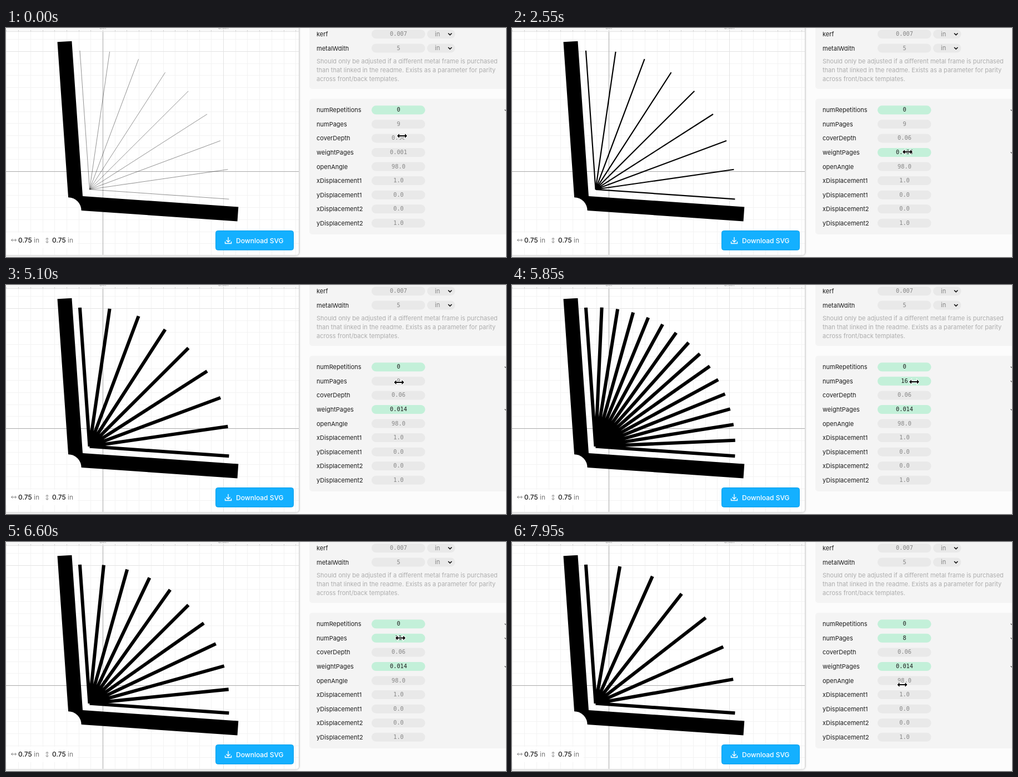
Recreate the animation shown at these times as an HTML page. Size 900 by 414 pixels, loop 8 s.

```html
<!DOCTYPE html>
<html lang="en">
<head>
<meta charset="utf-8">
<title>Book template editor</title>
<style>
  html, body { margin: 0; width: 100%; height: 100%; overflow: hidden; background: #fcfcfc; }
  svg { display: block; width: 100vw; height: 100vh; }
  text { font-family: Inter, sans-serif; font-size: 11px; fill: #1c1c1c; }
  .note { fill: #adadad; }
  .value { font-family: "DejaVu Sans Mono", monospace; font-size: 10.3px; fill: #858585; text-anchor: middle; }
  .pill { fill: #e9e9e9; }
  .changed .pill { fill: #c3f0d9; }
  .changed .value { fill: #1c1c1c; }
  .reset { display: none; fill: none; stroke: #555; stroke-width: 1.2; }
  .changed .reset { display: inline; }
  .size { font-size: 12px; font-weight: 500; }
  .unit { font-size: 12px; fill: #777; }
  .ruler { font-size: 8px; fill: #999; text-anchor: middle; }
  .icon { fill: none; stroke: #888; }
</style>
</head>
<body>
<svg viewBox="0 0 900 414">
  <defs>
    <filter id="shadow">
      <feDropShadow dx="0" dy="0" stdDeviation="1.5" flood-opacity=".25"/>
    </filter>
    <path id="span" d="M-4.5 0H4.5M-2 -2.5L-4.5 0L-2 2.5M2 -2.5L4.5 0L2 2.5"/>
  </defs>
  <rect width="900" height="414" fill="#fcfcfc"/>
  <rect x="-10" y="-10" width="537.5" height="421" rx="5" fill="#fff" stroke="#d4d4d4" filter="url(#shadow)"/>
  <g id="grid"></g>
  <path d="M118.4 23.7L138 304L418.3 323.6L416.5 349.5L135.7 329.9A24 24 0 0 0 112.1 306.2L92.5 25.3Z"/>
  <path id="pages" stroke="#000" fill="none"/>

  <rect x="-4" y="370" width="133" height="28" rx="4" fill="#fff" fill-opacity=".85"/>
  <use class="icon" href="#span" transform="translate(14 383.5)"/>
  <use class="icon" href="#span" transform="translate(74 384) rotate(90)"/>
  <text class="size" x="22" y="388">0.75</text><text class="unit" x="50" y="388">in</text>
  <text class="size" x="83" y="388">0.75</text><text class="unit" x="111" y="388">in</text>

  <rect x="377.5" y="366.5" width="140" height="35" rx="4" fill="#14b0ff" stroke="#0fa0ea"/>
  <path d="M400 378v9m-3.5 -3.5l3.5 3.5l3.5 -3.5M394.5 386v3.5h11v-3.5" fill="none" stroke="#fff" stroke-width="1.3"/>
  <text x="414" y="388.5" style="font-size:12px;font-weight:500;fill:#fff">Download SVG</text>

  <rect x="546" y="-10" width="370" height="120" rx="5" fill="#f4f4f4"/>
  <rect x="546" y="128" width="370" height="245" rx="5" fill="#f4f4f4"/>
  <text class="note" x="559" y="63.5">Should only be adjusted if a different metal frame is purchased</text>
  <text class="note" x="559" y="79.5">than that linked in the readme. Exists as a parameter for parity</text>
  <text class="note" x="559" y="95.5">across front/back templates.</text>
  <g id="rows"></g>
  <path id="cursor" d="M-9 0l4 -4v3h10v-3l4 4l-4 4v-3h-10v3z" stroke="#fff" stroke-width="2" paint-order="stroke"/>
</svg>
<script>
const LOOP = 8000;
const TICK = 150;
const INCH = 434;
const $ = id => document.getElementById(id);

function add(parent, tag, attrs, text = '') {
  const node = document.createElementNS('http://www.w3.org/2000/svg', tag);
  for (const key in attrs) node.setAttribute(key, attrs[key]);
  node.textContent = text;
  return parent.appendChild(node);
}

// Grid and ruler
const grid = $('grid');
const colors = ['#f3f3f3', '#e3e3e3', '#a9a9a9'];
const level = i => i === 0 ? 2 : i % 10 === 0 ? 1 : 0;
const at = (origin, i) => Math.round(origin + i * INCH / 20) + 0.5;
const line = (d, stroke) => add(grid, 'path', { d, stroke });

colors.forEach((color, n) => {
  for (let i = -12; i <= 17; i++) {
    if (level(i) !== n) continue;
    const x = at(174, i), y = at(259, i);
    if (x > 0 && x < 527) line(`M${x} 7V410`, color);
    if (y > 7 && y < 410) line(`M0 ${y}H527`, color);
  }
});
add(grid, 'rect', { width: 527, height: 6, fill: '#f8f8f8' });
line('M0 6.5H527', colors[1]);
for (let i = -8; i <= 16; i++) line(`M${at(174, i)} 4V6`, '#ccc');
add(grid, 'text', { class: 'ruler', x: 174, y: 2 }, '0in');
add(grid, 'text', { class: 'ruler', x: 391, y: 2 }, '0.5in');

// Parameter rows
function addPill(parent, x, y, width) {
  add(parent, 'rect', { class: 'pill', x, y: y - 8, width, height: 16, rx: 8 });
}
function addRow(name, value, y) {
  const row = add($('rows'), 'g', {});
  add(row, 'text', { x: 559, y: y + 4 }, name);
  addPill(row, 658, y, 96.5);
  const label = add(row, 'text', { class: 'value', x: 706.5, y: y + 3 }, value);
  add(row, 'path', { class: 'reset', d: `M897.5 ${y - 0.5}l3.5 2.5` });
  return (text, changed) => {
    label.textContent = text;
    row.setAttribute('class', changed ? 'changed' : '');
  };
}
function addUnitRow(name, value, y) {
  addRow(name, value, y);
  addPill($('rows'), 758, y, 50.5);
  add($('rows'), 'text', { x: 772, y: y + 3.5, style: 'fill:#858585' }, 'in');
  add($('rows'), 'path', { d: `M796 ${y - 1.5}l3.2 3l3.2 -3`, fill: 'none', stroke: '#111', 'stroke-width': 1.7 });
}
addUnitRow('kerf', '0.007', 11);
addUnitRow('metalWdith', '5', 36.5);

const params = {
  numRepetitions: '0', numPages: '9', coverDepth: '0.06', weightPages: '0.001', openAngle: '98.0',
  xDisplacement1: '1.0', yDisplacement1: '0.0', xDisplacement2: '0.0', yDisplacement2: '1.0'
};
const setRow = {};
Object.entries(params).forEach(([name, value], i) => {
  setRow[name] = addRow(name, value, 148.3 + i * 25.56);
});
setRow.numRepetitions('0', true);

// Pages fan out evenly over the open angle
function drawPages(count, weight) {
  let d = '';
  for (let i = 0; i < count; i++) {
    const a = (-94 + 98 * i / (count - 1)) * Math.PI / 180;
    d += `M150.5 291.8l${251.5 * Math.cos(a)} ${251.5 * Math.sin(a)}`;
  }
  $('pages').setAttribute('d', d);
  $('pages').setAttribute('stroke-width', weight / 1000 * INCH);
}

// Cursor stops: time, x, y; without x and y it rests until then
const stops = [
  [0, 713, 195], [450], [900, 710, 178], [1050, 707, 178], [1500, 701, 201], [1950, 703, 227],
  [2250], [2550, 712, 224], [2850], [3150, 726, 223], [3300], [3750, 736, 222],
  [4050], [4800, 706, 184], [5100, 707.5, 176], [5400], [5850, 724, 175],
  [6150], [6600, 710, 173.5], [6900, 701, 175], [7500], [7800, 705, 273], [7950, 702.5, 258]
];
stops.forEach((stop, i) => {
  if (stop.length === 1) stop.push(...stops[i - 1].slice(1));
});

function cursorAt(t) {
  const next = stops.findIndex(s => s[0] > t);
  if (next < 0) return stops.at(-1).slice(1);
  const [t0, x0, y0] = stops[next - 1];
  const [t1, x1, y1] = stops[next];
  const k = (t - t0) / (t1 - t0);
  return [x0 + (x1 - x0) * k, y0 + (y1 - y0) * k];
}

// A value follows the cursor's x while it is dragged
function dragged(t, start, end, initial, origin, pixels) {
  if (t < start) return initial;
  const [x] = cursorAt(Math.min(t, end));
  return initial + Math.round((x - origin) / pixels);
}

let shown;
function frame(now) {
  const t = Math.floor(now % LOOP / TICK) * TICK;
  if (t !== shown) {
    shown = t;
    const weight = dragged(t, 2400, 3750, 1, 701.3, 2.67);
    const count = dragged(t, 5550, 6900, 9, 704.4, 2.8);
    $('cursor').setAttribute('transform', `translate(${cursorAt(t)})`);
    setRow.weightPages((weight / 1000).toFixed(3), weight !== 1);
    setRow.numPages(count, count !== 9);
    drawPages(count, weight);
  }
  requestAnimationFrame(frame);
}
frame(0);
</script>
</body>
</html>
```
